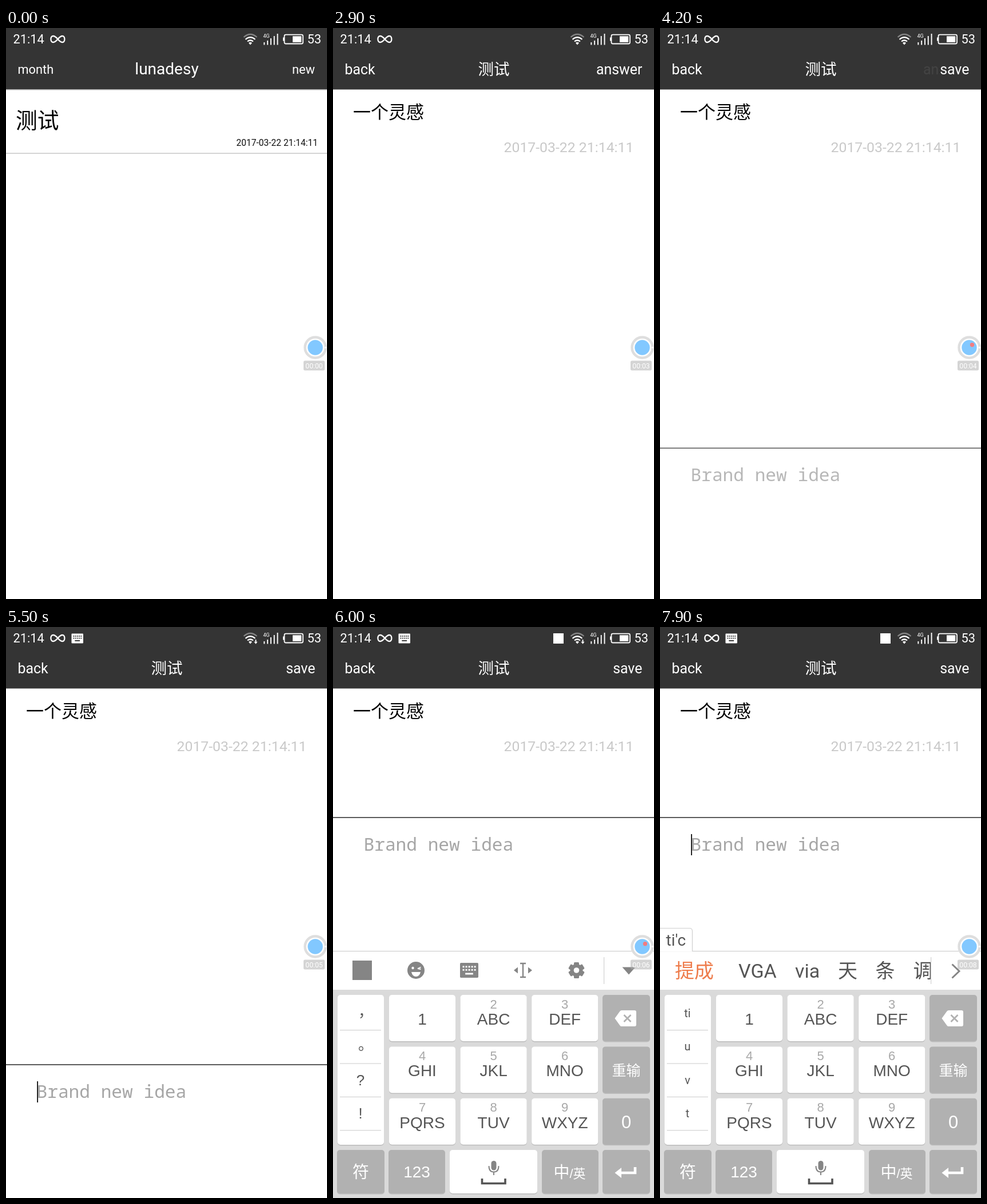
Write an HTML page that moves like this. It is 561x998 px and loops after 8 s.

```html
<!DOCTYPE html>
<html lang="zh-CN">
<head>
<meta charset="utf-8">
<title>Notes app</title>
<style>
html, body { margin: 0; width: 100%; height: 100%; overflow: hidden; background: #fff; }
svg { display: block; width: 100vw; height: 100vh; }
text { font-family: Roboto, "Noto Sans CJK SC", "Noto Sans CJK", sans-serif; white-space: pre; }
.cjk { font-family: "Noto Sans CJK SC", "Noto Sans CJK", sans-serif; font-weight: 300; }
.mono { font-family: "Noto Sans Mono", monospace; }
.key { font-family: "Liberation Sans", "Noto Sans CJK SC", "Noto Sans CJK", sans-serif; }
</style>
</head>
<body>
<svg id="stage" viewBox="0 0 561 998" preserveAspectRatio="none" xmlns="http://www.w3.org/2000/svg"></svg>
<script>
const DARK = '#343434', GREY = '#b1b1b1', INK = '#555', ICON = '#858585';
const LOOP = 8000;

const text = (s, x, y, size, fill, anchor = 'start', cls = '', more = '') =>
  `<text x="${x}" y="${y}" font-size="${size}" fill="${fill}" text-anchor="${anchor}" class="${cls}" ${more}>${s}</text>`;
const rect = (x, y, w, h, fill, r = 0, more = '') =>
  `<rect x="${x}" y="${y}" width="${w}" height="${h}" rx="${r}" fill="${fill}" ${more}/>`;
const circle = (x, y, r, fill, more = '') =>
  `<circle cx="${x}" cy="${y}" r="${r}" fill="${fill}" ${more}/>`;
const line = (d, stroke, w, more = '') =>
  `<path d="${d}" fill="none" stroke="${stroke}" stroke-width="${w}" ${more}/>`;
const shape = (d, fill) => `<path d="${d}" fill="${fill}"/>`;
const group = (id, body) => `<g id="${id}">${body}</g>`;

// Small keyboard glyph: a plate with two rows of holes and a space bar
function keyboardIcon(x, y, w, h, fill, hole) {
  const u = w / 21, v = h / 17;
  let s = rect(x, y, w, h, fill, u * 1.2);
  for (let row = 0; row < 2; row++)
    for (let i = 0; i < 5; i++)
      s += rect(x + u * (3 + i * 3.3), y + v * (3.5 + row * 3.6), u * 1.9, v * 1.9, hole);
  return s + rect(x + u * 6, y + v * 11.5, u * 9, v * 1.9, hole);
}

function statusBar() {
  const white = '#fff';
  let s = text('21:14', 12.5, 27, 21.8, white) + text('53', 551, 27, 21.8, white, 'end');
  s += line('M90.5 19.5C87 15.5 84.5 14 82.5 14C76.700 14 77.300 25 82.500 25C84.500 25 87 23.500 90.500 19.500C94 15.500 96.500 14 98.500 14C103.700 14 103.700 25 98.500 25C96.500 25 94 23.500 90.500 19.500Z', white, 2.3);
  s += line('M415.500 16Q427 6 438.500 16', '#858585', 2.2);
  s += line('M418.500 20Q427 12.500 435.500 20M422 23.500Q427 19.500 432 23.500', white, 2.2);
  s += shape('M424 26Q427 23.500 430 26L427 29.500Z', white);
  s += text('4G', 449.5, 17, 9, white);
  [25, 22, 18, 14, 10].forEach((y, i) => s += rect(450.4 + i * 5.8, y, 1.9, 29.5 - y, white));
  s += rect(486.5, 11.7, 32.5, 15.8, 'none', 2.5, `stroke="${white}" stroke-width="1.8"`);
  s += rect(484, 16.5, 2, 6, white) + rect(501, 14.3, 15.3, 10.6, white);
  s += group('arrow', rect(433, 22, 7, 8, DARK) + rect(435.6, 22, 1.8, 4.5, white) + shape('M433.400 25.700H439.600L436.500 29.800Z', white));
  s += group('imeIcon', keyboardIcon(114.5, 11.5, 20.5, 17, white, DARK));
  return s + group('imeBadge', rect(385, 11, 18, 18, white));
}

const listScene = () =>
  text('month', 20.5, 80, 21.8, '#fff') +
  text('lunadesy', 281, 81, 28, '#fff', 'middle') +
  text('new', 540, 80, 21.8, '#fff', 'end') +
  rect(0, 107, 561, 1.6, '#b4b4b4') +
  text('测试', 17, 174.7, 37.8, '#000', 'start', 'cjk') +
  text('2017-03-22 21:14:11', 545, 206, 15.58, '#111', 'end') +
  rect(0, 218.300, 561, 1.5, '#c6c6c6');

const detailScene = () =>
  text('back', 20.5, 81, 24.93, '#fff') +
  text('测试', 281, 81.5, 27.6, '#fff', 'middle', 'cjk') +
  group('answer', text('answer', 540.5, 81, 24.93, '#fff', 'end')) +
  group('save', rect(488, 58, 56, 34, DARK) + text('save', 540.5, 81, 24.93, '#fff', 'end')) +
  text('一个灵感', 35, 158, 31, '#000', 'start', 'cjk') +
  text('2017-03-22 21:14:11', 525.5, 217, 24.8, '#c9c9c9', 'end');

const inputPanel = () =>
  rect(0, -.8, 561, 1.6, '#333') +
  text('Brand new idea', 53.5, 58, 31.16, '#a6a6a6', 'start', 'mono') +
  `<g id="caret">${rect(54.3, 29, 1.7, 37, '#000')}</g>`;

const cell = (x, y, w, h, fill, id = '') =>
  rect(x, y + 1.5, w, h, '#bcbcbc', 5) + rect(x, y, w, h, fill, 5, id && `id="${id}"`);

function toolbar() {
  let s = rect(34, 583, 34, 34, ICON);
  s += circle(145, 600, 15, ICON) + circle(139.500, 596, 2.2, '#fff');
  s += line('M148 597L153.500 594.500M148 597L153.500 598', '#fff', 1.8);
  s += shape('M137 603H153Q151 611 145 611Q139 611 137 603Z', '#fff');
  s += keyboardIcon(222, 587, 32, 26, ICON, '#fff');
  s += line('M327 588H337M327 612H337M332 588V612', ICON, 2.4);
  s += shape('M323 594.500V605.500L316 600ZM341 594.500V605.500L348 600Z', ICON);
  for (let a = 0; a < 360; a += 60)
    s += rect(421, 586, 9, 9, ICON, 1.5, `transform="rotate(${a} 425.500 600)"`);
  s += circle(425.5, 600, 11, ICON) + circle(425.5, 600, 4.8, '#fff');
  return s + shape('M505.500 594.500H528.500L517 607.500Z', ICON);
}

function candidates() {
  let s = '<g clip-path="url(#strip)">';
  s += group('words', '') + '</g>';
  s += line('M510.500 589.500L523 601.500L510.500 613.500', ICON, 3);
  s += group('pinyin', '');
  return s;
}

function keypad() {
  let s = rect(0, 634, 561, 364, '#dadada');
  s += cell(8, 643, 81, 262, '#fff');
  for (let i = 0; i < 4; i++) s += rect(12, 704 + i * 58.4, 72, 1.2, '#d2d2d2');
  s += group('side', '');
  ['1', 'ABC', 'DEF', 'GHI', 'JKL', 'MNO', 'PQRS', 'TUV', 'WXYZ'].forEach((label, i) => {
    const x = 98 + i % 3 * 124.6, y = 643 + Math.floor(i / 3) * 90.4, mid = x + 58;
    s += cell(x, y, 116, 81, '#fff', 'key' + (i + 1));
    if (i) s += text(i + 1, mid, y + 23.5, 22, '#a8a8a8', 'middle', 'key');
    s += text(label, mid, y + 52, 28, INK, 'middle', 'key');
  });
  for (let i = 0; i < 3; i++) s += cell(471, 643 + i * 90.4, 83, 81, GREY);
  s += shape('M492.500 684L501.500 671.500Q502.500 670 504.500 670H527Q530 670 530 673V695Q530 698 527 698H504.500Q502.500 698 501.500 696.500Z', '#fff');
  s += line('M508.500 678L520.500 690M520.500 678L508.500 690', GREY, 2.8);
  s += text('重输', 512.5, 784, 25, '#fff', 'middle', 'key');
  s += text('0', 512.5, 875.5, 31, '#fff', 'middle', 'key');
  s += cell(7, 914, 83, 76, GREY) + cell(97, 914, 99, 76, GREY) + cell(204, 914, 153, 76, '#fff');
  s += cell(365, 914, 99, 76, GREY) + cell(471, 914, 83, 76, GREY);
  s += text('符', 48.5, 963, 29, '#fff', 'middle', 'key') + text('123', 146.5, 962, 28, '#fff', 'middle', 'key');
  s += text('中<tspan font-size="22">/英</tspan>', 413.5, 963, 28, '#fff', 'middle', 'key');
  s += rect(276.5, 933, 9, 16.5, ICON, 4.5);
  s += line('M272.500 942Q272.500 952.500 281 952.500Q289.500 952.500 289.500 942M281 952.500V958', ICON, 2);
  s += line('M260.500 964V972.500H301V964', INK, 3.6);
  s += line('M528 944V954H501', '#fff', 4.6) + shape('M492.500 954L504 945V963Z', '#fff');
  return s;
}

const keyboard = () =>
  rect(0, 566, 561, 69, '#fff') + rect(0, 566, 561, 1.2, '#cfcfcf') +
  group('tools', toolbar()) + group('cands', candidates()) +
  rect(473, 577, 1.2, 47, '#d2d2d2') + keypad();

const recorder = () =>
  circle(540.5, 558.5, 18, '#fff', 'stroke="#dedede" stroke-width="4.400"') +
  circle(540.5, 558.5, 13.2, '#82c8ff') + circle(558.5, 558.5, 1.7, '#fff') +
  circle(545.5, 553.7, 3.7, '#f27c80', 'id="dot"') +
  rect(520, 581.5, 37, 17, '#a9a9a9', 2.5, 'opacity=".5"') +
  text('', 538.5, 594.6, 12.2, '#fff', 'middle', '', 'id="clock"');

const stage = document.getElementById('stage');
stage.innerHTML =
  '<defs><clipPath id="strip"><rect x="0" y="567" width="473" height="67"/></clipPath></defs>' +
  rect(0, 0, 561, 998, '#fff') + rect(0, 0, 561, 107.5, DARK) +
  group('list', listScene()) + group('detail', detailScene()) +
  group('panel', inputPanel()) + group('board', keyboard()) + statusBar() + recorder();

const el = {};
stage.querySelectorAll('[id]').forEach(n => el[n.id] = n);

const ramp = (t, a, b) => Math.min(1, Math.max(0, (t - a) / (b - a)));
const easeOut = p => 1 - (1 - p) ** 3;
const show = (n, on) => n.setAttribute('display', on ? 'inline' : 'none');
const fade = (n, o) => { n.setAttribute('opacity', o); show(n, o > 0); };
const move = (n, y) => n.setAttribute('transform', `translate(0 ${y})`);

// cubic-bezier(.25, .1, .25, 1)
function ease(p) {
  let lo = 0, hi = 1, s = p;
  for (let i = 0; i < 20; i++) {
    s = (lo + hi) / 2;
    const x = .75 * s * (1 - s) + s ** 3;
    if (x < p) lo = s; else hi = s;
  }
  return .3 * s * (1 - s) ** 2 + 3 * s * s * (1 - s) + s ** 3;
}

// What the input method shows after each key press
const typed = [
  { from: 0, side: ['，', '。', '?', '!'] },
  { from: 6800, pinyin: 't', side: ['t', 'u', 'v', '8'], words: [['他', 26], ['天', 100], ['太', 174], ['听', 248], ['它', 322], ['她', 396]] },
  { from: 7400, pinyin: 'ti', side: ['ti', 'u', 'v', 't'], words: [['提', 26], ['体', 100], ['题', 174], ['天', 248], ['条', 322], ['听', 396]] },
  { from: 7800, pinyin: "ti'c", side: ['ti', 'u', 'v', 't'], words: [['提成', 26], ['VGA', 137], ['via', 236], ['天', 311], ['条', 376.5], ['调', 442.5]] }
];
let current = null;

function setTyped(state) {
  if (state === current) return;
  current = state;
  const { pinyin, side, words = [] } = state;
  show(el.tools, !pinyin);
  show(el.cands, pinyin);
  el.side.innerHTML = side.map((c, i) => {
    const wide = c === '，' || c === '。';
    return text(c, wide ? 57 : 48, (pinyin ? 682 : wide ? 681 : 684) + i * 58.3, pinyin ? 20 : 26, INK, 'middle', pinyin ? '' : 'key');
  }).join('');
  el.words.innerHTML = words.map(([w, x], i) =>
    text(w, x, 613.3, 34, i ? INK : '#ee7c4c', 'start', w > '~' ? 'cjk' : '')).join('');
  if (pinyin) {
    const w = pinyin.length > 2 ? 56.5 : 38;
    el.pinyin.innerHTML =
      `<path d="M-2 567V526.500H${w - 5}Q${w} 526.500 ${w} 531.500V567" fill="#fff" stroke="#cfcfcf" stroke-width="1.200"/>` +
      text(pinyin, 10.5, 557, 28, INK);
  }
}

function draw(t) {
  const page = ease(ramp(t, 2330, 2820));
  fade(el.list, 1 - page);
  fade(el.detail, page);

  fade(el.answer, t < 3700 ? 1 - .8 * ramp(t, 3330, 3480) : .2 * (1 - ramp(t, 3700, 4500)));
  fade(el.save, ramp(t, 3680, 4000));

  const drop = ease(ramp(t, 3700, 4700));
  fade(el.panel, drop);
  move(el.panel, t < 5700 ? 765 - 156 * (1 - drop) : 333);
  show(el.caret, t >= 5500 && (t - 5500) % 1000 < 500);

  show(el.board, t >= 5560);
  move(el.board, 432 * (1 - easeOut(ramp(t, 5560, 5900))));
  show(el.imeIcon, t >= 5500);
  show(el.imeBadge, t >= 5700);
  show(el.arrow, (t >= 400 && t < 1400) || (t >= 5500 && t < 6500));

  setTyped(typed.filter(s => t >= s.from).pop());
  el.key8.setAttribute('fill', t >= 6800 && t < 6900 ? '#d0d0d0' : '#fff');
  el.key4.setAttribute('fill', t >= 7400 && t < 7500 ? '#d0d0d0' : '#fff');

  show(el.dot, t >= 1000 && (t - 1000) % 2400 < 1200);
  el.clock.textContent = '00:0' + Math.floor((t + 100) / 1000);
}

const start = performance.now();
function tick() {
  draw((performance.now() - start) % LOOP);
  requestAnimationFrame(tick);
}
tick();
</script>
</body>
</html>
```
